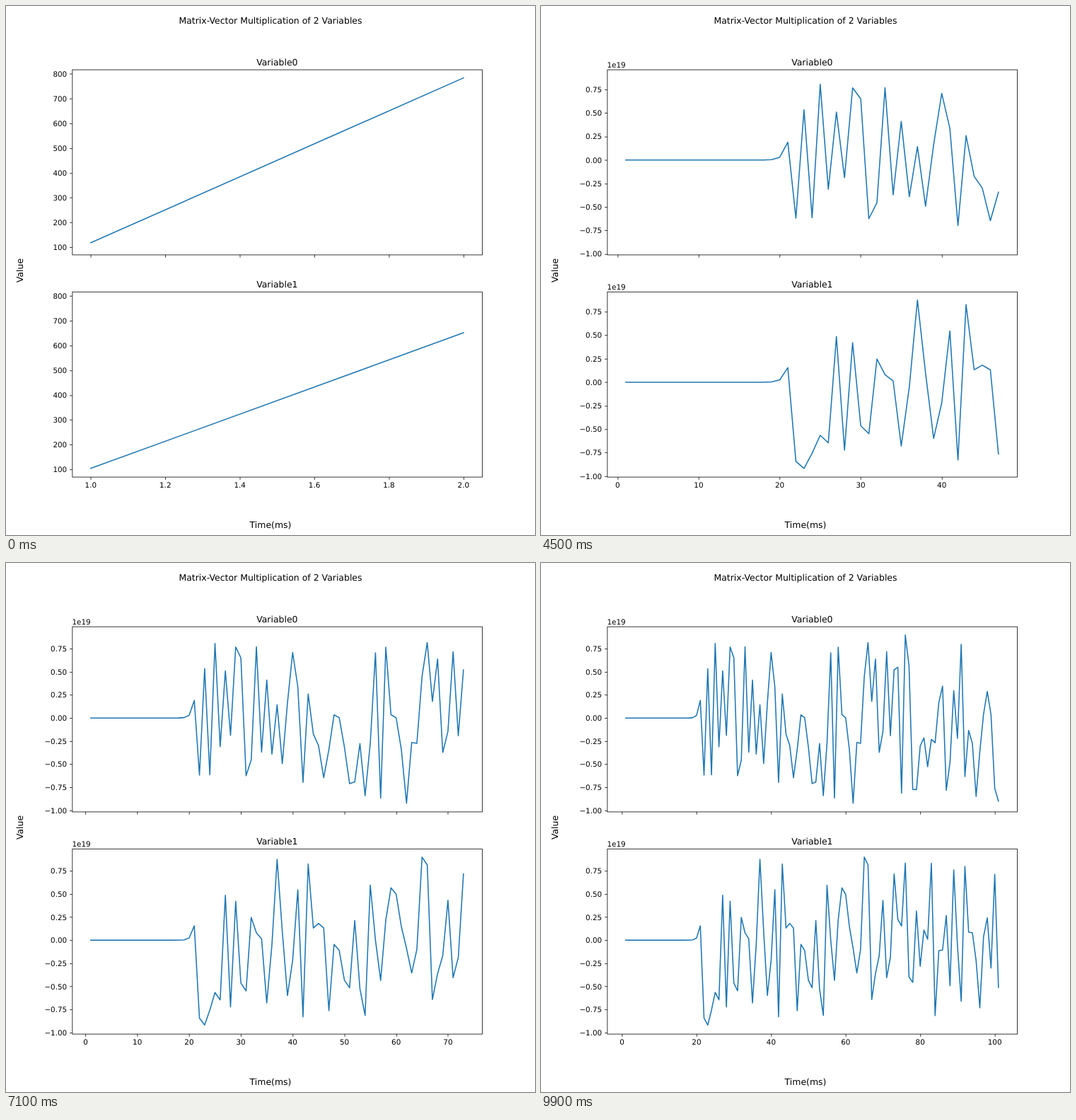
Write an HTML page that moves like this. It is 748 px wide and 748 px high and loops after 10 s.

```html
<!DOCTYPE html>
<html lang="en">
<head>
<meta charset="utf-8">
<title>Matrix-Vector Multiplication</title>
<style>
  html, body { margin: 0; width: 100%; height: 100%; overflow: hidden; background: #fff; }
  svg { display: block; width: 748px; height: 748px; }
  text { font: 16.667px "DejaVu Sans", sans-serif; text-anchor: middle; text-rendering: geometricPrecision; }
  .tick text { font-size: 13.889px; }
  .y text { text-anchor: end; }
  text.power { font-size: 13.889px; text-anchor: start; }
  .edge, .tick path { fill: none; stroke: #000; stroke-width: 1.05; }
  .curve { fill: none; stroke: #1f77b4; stroke-width: 2.083; stroke-linejoin: round; stroke-linecap: square; }
</style>
</head>
<body>
<svg viewBox="0 0 1000 1000">
  <text x="500" y="33">Matrix-Vector Multiplication of 2 Variables</text>
  <text x="500" y="987.3">Time(ms)</text>
  <text transform="translate(32.4 500) rotate(-90)">Value</text>
</svg>
<script>
const STEP_MS = 100, STEPS = 100;
const LEFT = 125, WIDTH = 775, HEIGHT = 350, TOPS = [120, 540];
const svg = document.querySelector('svg');

function add(parent, tag, attrs = {}, text = '') {
  const el = document.createElementNS('http://www.w3.org/2000/svg', tag);
  for (const name in attrs) el.setAttribute(name, attrs[name]);
  el.textContent = text;
  return parent.appendChild(el);
}

// Repeated product with [[4, 3], [2, 4]], overflowing as signed 64-bit integers
const series = [[], []];
let a = 16n, b = 18n;
for (let i = 0; i <= STEPS; i++) {
  [a, b] = [4n * a + 3n * b, 2n * a + 4n * b].map(v => BigInt.asIntN(64, v));
  series[0].push(Number(a));
  series[1].push(Number(b));
}

const plots = TOPS.map((top, i) => {
  add(svg, 'text', { x: LEFT + WIDTH / 2, y: top - 8.2 }, 'Variable' + i);
  const plot = {
    top,
    data: series[i],
    curve: add(svg, 'path', { class: 'curve' }),
    xTicks: add(svg, 'g', { class: 'tick' }),
    yTicks: add(svg, 'g', { class: 'tick y' }),
    power: add(svg, 'text', { class: 'power', x: LEFT, y: top - 4.17 })
  };
  add(svg, 'rect', { class: 'edge', x: LEFT + 0.5, y: top + 0.5, width: WIDTH, height: HEIGHT });
  return plot;
});

// Axis limits with a 5% margin, and at most nine round intervals
function makeAxis(min, max) {
  const pad = (max - min) * 0.05, lo = min - pad, hi = max + pad;
  const raw = (hi - lo) / 9, base = 10 ** Math.floor(Math.log10(raw));
  const step = base * [1, 2, 2.5, 5, 10].find(s => s >= raw / base - 1e-9);
  const values = [];
  for (let k = Math.ceil(lo / step); k <= Math.floor(hi / step); k++) values.push(k * step);

  const largest = Math.max(...values.map(Math.abs));
  let power = Math.floor(Math.log10(largest) + 1e-9);
  if (power < 6) power = 0;
  const unit = 10 ** power;
  let digits = 0;
  const isWhole = v => Math.abs(v - Math.round(v)) < 1e-6;
  while (digits < 3 && !isWhole(step / unit * 10 ** digits)) digits++;

  return {
    power, values,
    label: v => (v / unit).toFixed(digits).replace('-', '\u2212'),
    part: v => (v - lo) / (hi - lo)
  };
}

const snap = v => Math.floor(v + 0.5) + 0.5;

function draw(count) {
  const shown = plots.flatMap(p => p.data.slice(0, count));
  const xAxis = makeAxis(1, count);
  const yAxis = makeAxis(Math.min(...shown), Math.max(...shown));
  const xAt = v => LEFT + WIDTH * xAxis.part(v);

  plots.forEach((plot, i) => {
    const bottom = plot.top + HEIGHT;
    const yAt = v => bottom - HEIGHT * yAxis.part(v);
    const points = plot.data.slice(0, count).map((v, n) => xAt(n + 1).toFixed(2) + ' ' + yAt(v).toFixed(2));
    plot.curve.setAttribute('d', 'M' + points.join('L'));
    plot.power.textContent = yAxis.power ? '1e' + yAxis.power : '';

    plot.xTicks.replaceChildren();
    for (const v of xAxis.values) {
      const x = xAt(v);
      add(plot.xTicks, 'path', { d: `M${snap(x)} ${bottom + 0.5}v5` });
      if (i === 1) add(plot.xTicks, 'text', { x, y: bottom + 21 }, xAxis.label(v));
    }
    plot.yTicks.replaceChildren();
    for (const v of yAxis.values) {
      const y = yAt(v);
      add(plot.yTicks, 'path', { d: `M${LEFT + 0.5} ${snap(y)}h-5` });
      add(plot.yTicks, 'text', { x: LEFT - 9.72, y: y + 5.1 }, yAxis.label(v));
    }
  });
}

const start = performance.now();
let current = -1;
function tick() {
  const index = Math.floor((performance.now() - start) / STEP_MS) % STEPS;
  if (index !== current) draw((current = index) + 2);
  requestAnimationFrame(tick);
}
tick();
</script>
</body>
</html>
```
